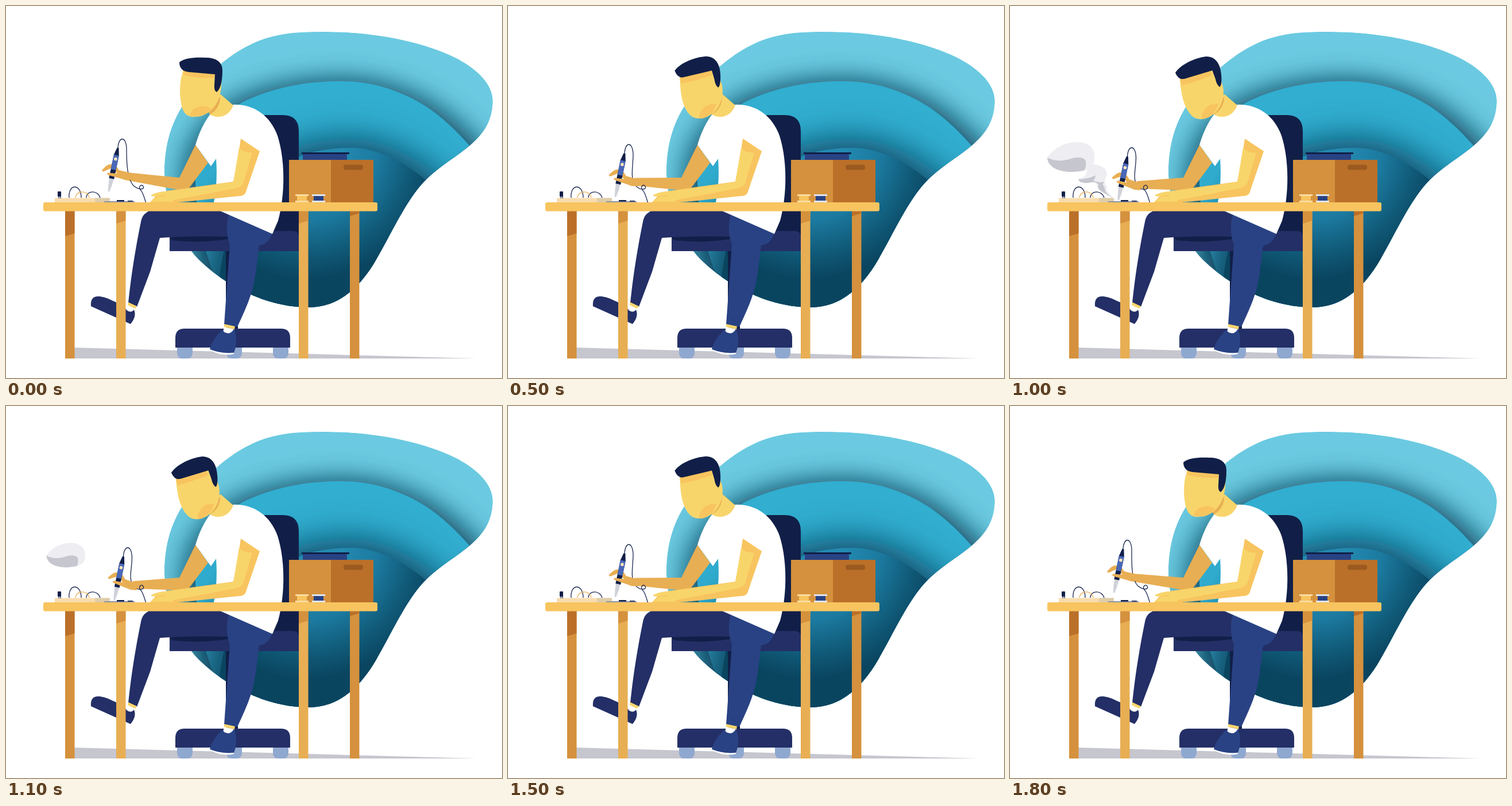
Recreate the animation shown at these times as an HTML page. Size 864x648 px, loop 1.9 s.

```html
<!DOCTYPE html>
<html lang="en">
<head>
<meta charset="utf-8">
<title>Soldering at a desk</title>
<style>
html, body { margin: 0; width: 100%; height: 100%; overflow: hidden; background: #fff; }
svg { display: block; width: 100%; height: 100%; }
.night { fill: #111f48; } .navy { fill: #232f66; } .blue { fill: #294284; }
.yellow { fill: #f8d56b; } .amber { fill: #f8c45f; } .tan { fill: #e8ae53; }
.wood { fill: #d5913d; } .brown { fill: #bb7029; } .white { fill: #fff; }
.steel { fill: #8fa8cf; } .grey { fill: #c6c6cf; } .fog { fill: #eeeef2; }
.wire { fill: none; stroke: #1c2852; stroke-width: 1.3; }
</style>
</head>
<body>
<svg viewBox="0 0 864 648">
  <defs>
    <radialGradient id="deep" gradientUnits="userSpaceOnUse" cx="525" cy="250" r="245">
      <stop offset=".25" stop-color="#2389b0"/><stop offset=".5" stop-color="#1c7aa0"/>
      <stop offset=".74" stop-color="#105a78"/><stop offset=".92" stop-color="#0a4560"/>
    </radialGradient>
    <filter id="soft" x="-30%" y="-30%" width="160%" height="160%"><feGaussianBlur stdDeviation="22"/></filter>
    <filter id="softer" x="-30%" y="-30%" width="160%" height="160%"><feGaussianBlur stdDeviation="27"/></filter>
    <path id="outer" d="M276 280C277 245 286 205 310 170C340 128 390 77 450 57C490 44 530 45 560 45C630 45 710 58 770 84C820 106 848 136 848 165C848 200 832 223 808 243C780 266 755 279 730 304C695 340 670 400 640 450C605 505 568 525 525 525C460 524 390 494 336 442C296 401 274 335 276 280Z"/>
    <path id="middle" d="M900 380C840 270 785 212 735 177C685 145 635 131 585 131C520 131 465 142 415 166C355 200 328 255 330 310C332 380 345 430 390 540H900Z"/>
    <path id="inner" d="M780 350C735 300 670 247 600 247C555 247 515 256 480 278C410 320 372 380 365 560H780Z"/>
    <clipPath id="inside"><use href="#outer"/></clipPath>
  </defs>

  <g clip-path="url(#inside)">
    <use href="#outer" fill="#6bcae1"/>
    <use href="#middle" fill="#0a4a62" filter="url(#soft)" transform="translate(580 300) scale(1.08 1.02) translate(-580 -300)"/>
    <use href="#middle" fill="#31aed0"/>
    <use href="#inner" fill="#0a4a66" filter="url(#softer)" transform="translate(600 400) scale(1.14 1.1) translate(-600 -400)"/>
    <use href="#inner" fill="url(#deep)"/>
  </g>

  <path class="grey" d="M119 595L820 614H119Z"/>

  <!-- chair -->
  <path class="night" d="M440 190H482Q510 190 510 218V400H440ZM383 425H404V565H383Z"/>
  <path class="navy" d="M285 402L384 396V392H500Q510 392 510 402V427H285Z"/>
  <path class="night" d="M285 402L387 397V406Q340 413 300 409Q286 409 285 402Z"/>
  <path class="navy" d="M295 595V578Q295 562 311 562H479Q495 562 495 578V595Z"/>
  <g class="steel" id="wheels"></g>

  <!-- far leg -->
  <path class="white" d="M210 520L227 526L222 536L207 532Z"/>
  <path class="white" d="M148 523L217 554L213 557L149 527Z"/>
  <path class="navy" d="M148 523C147 509 153 505 164 506C180 508 193 519 206 521C209 534 219 535 223 529Q228 541 217 554Z"/>
  <path class="navy" d="M258 355C242 358 237 365 235 376C225 425 218 470 213 517L228 524L251 463L268 404Q320 400 388 402L400 355Z"/>
  <path class="yellow" d="M213 516L228 523L225 527L212 521Z"/>

  <!-- near leg -->
  <path class="white" d="M380 559L398 563L397 573L378 568Z"/>
  <path class="white" d="M355 597Q375 607 397 603V606Q377 611 356 600Z"/>
  <path class="blue" d="M355 598C358 585 366 574 377 564C382 573 393 572 397 562C403 577 402 592 397 604Q375 606 355 598Z"/>
  <path class="blue" d="M389 360Q380 389 390 416L380 555L403 559C421 520 430 500 435 464L441 417C453 416 459 408 464 396V360Z"/>
  <path class="yellow" d="M380 554L399 558L398 563L380 559Z"/>

  <path id="forearm" class="tan"/>

  <!-- torso, neck, near arm -->
  <path class="white" d="M357 187L395 172C430 170 460 190 473 226C487 270 486 330 474 374L464 397L373 357L362 342Q369 307 366 266L357 279L330 242Q340 208 357 187Z"/>
  <path class="yellow" d="M374 154L396 173C391 186 381 193 370 193Q359 193 354 187L360 160Z"/>
  <path class="tan" d="M373 158C373 174 365 183 355 189L350 179Z"/>
  <path class="amber" d="M409 231L442 253L417 326Q414 331 406 331L330 339L298 342H251L262 330L280 322L396 306L403 270Z"/>
  <path class="yellow" d="M406 247Q416 257 429 255L414 306Q412 314 402 317L325 332L275 341Q262 338 280 329L264 331Q256 333 252 330Q263 323 280 323L396 307Z"/>
  <path class="yellow" d="M252 341L264 332L283 332Q290 336 292 341Z"/>

  <!-- head -->
  <g id="headUp">
    <path class="yellow" d="M309 112C301 132 302 160 307 178C311 190 319 194 329 193C348 193 364 180 371 160Q377 143 375 112Z"/>
    <path class="amber" d="M308 112L364 117V125Q332 127 310 120ZM320 191C322 177 341 169 358 179Q344 196 320 191Z"/>
    <path class="night" d="M302 98C312 90 330 89 347 90C367 90 377 98 377 112C377 131 374 144 367 150Q362 148 363 137L364 119L318 115Q302 113 302 98Z"/>
  </g>
  <g id="headDown">
    <g id="face">
      <path class="yellow" d="M303 120C302 150 304 172 316 187C324 197 340 197 352 190C367 182 375 166 376 149Q377 136 366 112Z"/>
      <path class="amber" d="M303 121L357 112L360 121Q330 129 305 132ZM332 195C334 178 349 168 364 172Q354 195 332 195Z"/>
    </g>
    <path class="night" d="M293 109C305 95 330 88 348 87.500C366 88 373 104 372 122C372 132 370 141 367 143Q362 140 361 128L357.500 113L308 121.500Q297 123 293 109Z"/>
  </g>

  <!-- box and tray -->
  <path class="wood" d="M493 268H566V342H493Z"/>
  <path class="brown" d="M566 268H640V342H566Z"/>
  <rect x="588" y="276.500" width="34" height="9" rx="4" fill="#9c5a20"/>
  <path class="blue" d="M517 257H594V268H517Z"/>
  <path class="night" d="M515 255H598V258H515Z"/>
  <path class="amber" d="M507 330H524V341H507Z"/>
  <path d="M504 328H527V331H504ZM504 339H527V342H504Z" fill="#fadca0"/>
  <path class="blue" d="M536 330H553V341H536Z"/>
  <path d="M533 328H556V331H533ZM533 339H556V342H533Z" fill="#dfe5f2"/>

  <!-- electronics -->
  <path d="M85 334.500H181V342H85Z" fill="#f9dcae"/>
  <path d="M155 334.500H181V342H155Z" fill="#ddcda9"/>
  <path class="wire" d="M110 334C108 309 131 309 131 334M140 334C140 321 160 320 164 334M92 330V335M95 330V335"/>
  <path class="wire" d="M121 334C122 321 143 320 145 334" style="stroke:#e8ae53"/>
  <rect class="night" x="90" y="323" width="6" height="9" rx="1"/>
  <path d="M171 340H224V343H171Z" fill="#8d94a6"/>
  <path class="night" d="M193 338H206V340.500H193ZM212 339H221V340.500H212Z"/>

  <!-- smoke -->
  <g id="puff">
    <path class="fog" d="M153 307C152 299 161 296 169 297C178 297 184 302 182 309C188 313 187 320 183 324L187 338L176 332C165 337 157 331 161 324C167 322 167 316 161 314Q153 313 153 307Z"/>
    <path class="grey" d="M154 311Q164 314 171 308Q172 315 168 320Q176 322 181 317Q184 329 176 333Q166 337 161 330Q171 328 167 319Q165 313 154 311Z"/>
  </g>
  <g id="plume">
    <g id="tail">
      <path class="fog" d="M140 276C157 275 169 283 169 293C166 302 162 307 169 314C166 325 177 329 186 339L161 324C151 318 154 310 145 306C132 311 120 309 119 301Q137 297 133 284Z"/>
      <path class="grey" d="M119 302Q137 301 149 295Q149 300 145 304Q156 309 164 306Q160 312 165 316Q164 325 181 336L161 324Q150 318 154 311Q150 306 143 307Q122 311 119 302Z"/>
    </g>
    <path class="fog" d="M65 264C74 249 96 236 119 237C139 238 148 249 147 264C147 273 144 282 134 285C113 292 67 291 65 264Z"/>
    <path class="grey" d="M65 264Q81 273 103 267Q123 260 131 268Q134 276 130 286C107 293 66 289 65 264Z"/>
  </g>

  <!-- iron -->
  <path id="cable" class="wire"/>
  <g id="hand">
    <path class="tan" d="M218 291L197 286C191 275 181 273 174 279L167 286Q168 290 173 287L182 283L187 285L195 293L207 303H219Z"/>
    <g id="iron">
      <path class="night" d="M-1.500 0H1.500L4.500 13V55H-4.500V13Z"/>
      <path d="M-4.500 13H4.500V39H-4.500Z" fill="#4968b8"/>
      <circle cy="20" r="2.800" fill="#f9e3b8"/>
      <path d="M-4 55H4L3 67L1.200 78H-1.200L-3 67Z" fill="#d0d2da"/>
    </g>
    <path class="tan" d="M210 292L196 292L178 290.500Q174 292 178 294.500L194 299L208 303Z"/>
  </g>

  <!-- desk -->
  <g id="deskLegs"></g>
  <rect class="amber" x="65" y="342" width="582" height="15.500" rx="3"/>
</svg>
<script>
const el = id => document.getElementById(id);
const LOOP = 1900;

el("wheels").innerHTML = [298, 384, 465].map(x =>
  `<path d="M${x} 595h27v9q0 10-10 10h-7q-10 0-10-10z"/>`).join("");

// left edge, depth of the shade under the desk top, colours
el("deskLegs").innerHTML = [
  [103, 44, "wood", "brown"], [192, 22, "tan", "wood"],
  [510, 22, "tan", "wood"], [599, 9, "wood", "brown"]
].map(([x, shade, light, dark]) =>
  `<path class="${light}" d="M${x} 357h16.500v257h-16.500z"/>
   <path class="${dark}" d="M${x} 357h16.500v${shade - 5}l-16.500 5z"/>`).join("");

// hand shift, hand turn and bow of the head (0 to 1; null = upright)
const POSES = {
  lifted: { x: 0, y: 0, turn: 0, bow: null },
  leaving: { x: 2, y: 2, turn: 0, bow: null },
  near: { x: 6, y: 4.5, turn: 1, bow: 0 },
  closing: { x: 8, y: 9.5, turn: 3, bow: .5 },
  touching: { x: 9.5, y: 15, turn: 6, bow: 1 }
};
const STEPS = [
  [0, "lifted"], [200, "leaving"], [300, "near"], [500, "closing"], [600, "touching"],
  [1500, "closing"], [1600, "near"], [1800, "leaving"]
];
const show = (id, on) => el(id).style.display = on ? "" : "none";

function drawPose({ x, y, turn, bow }) {
  const bowed = bow !== null;
  show("headUp", !bowed);
  show("headDown", bowed);
  if (bowed) {
    el("headDown").setAttribute("transform", `rotate(${-7 * bow} 349.5 154)`);
    el("face").setAttribute("transform", `translate(${-3.5 * bow} 0)`);
  }
  el("hand").setAttribute("transform", `translate(${x} ${y}) rotate(${turn} 190 295)`);
  // the iron keeps its slant while the hand turns
  el("iron").setAttribute("transform",
    `rotate(${-turn} 190 295) translate(195 247) rotate(11.8)`);
  el("forearm").setAttribute("d",
    `M330 242L302 299L${212 + x} ${290 + y}L${207 + x} ${303 + y}L305 321Q316 322 322 313L352 273Z`);
  el("cable").setAttribute("d",
    `M${195 + x} ${247 + y}c1-20 14-21 15 1C${210 + x} ${275 + y * .8} 211 ${300 + y * .3} ${222 + x * .4} ${313 + y * .3}
     C232 321 242 320 239 314C236 309 230 315 234 320C241 326 243 345 249 360`);
}

function drawSmoke(t) {
  show("puff", t >= 800 && t < 900);
  show("plume", t >= 900 && t < 1300);
  show("tail", t < 1100);
  const [scale, cx, cy] = t < 1000 ? [.64, 186, 339] : t < 1100 ? [1, 0, 0]
    : t < 1200 ? [.82, 95, 245] : [.45, 90, 235];
  el("plume").setAttribute("transform",
    `translate(${cx} ${cy}) scale(${scale}) translate(${-cx} ${-cy})`);
}

function frame() {
  const t = performance.now() % LOOP;
  const step = STEPS.filter(([start]) => start <= t).pop();
  drawPose(POSES[step[1]]);
  drawSmoke(t);
  requestAnimationFrame(frame);
}
frame();
</script>
</body>
</html>
```
